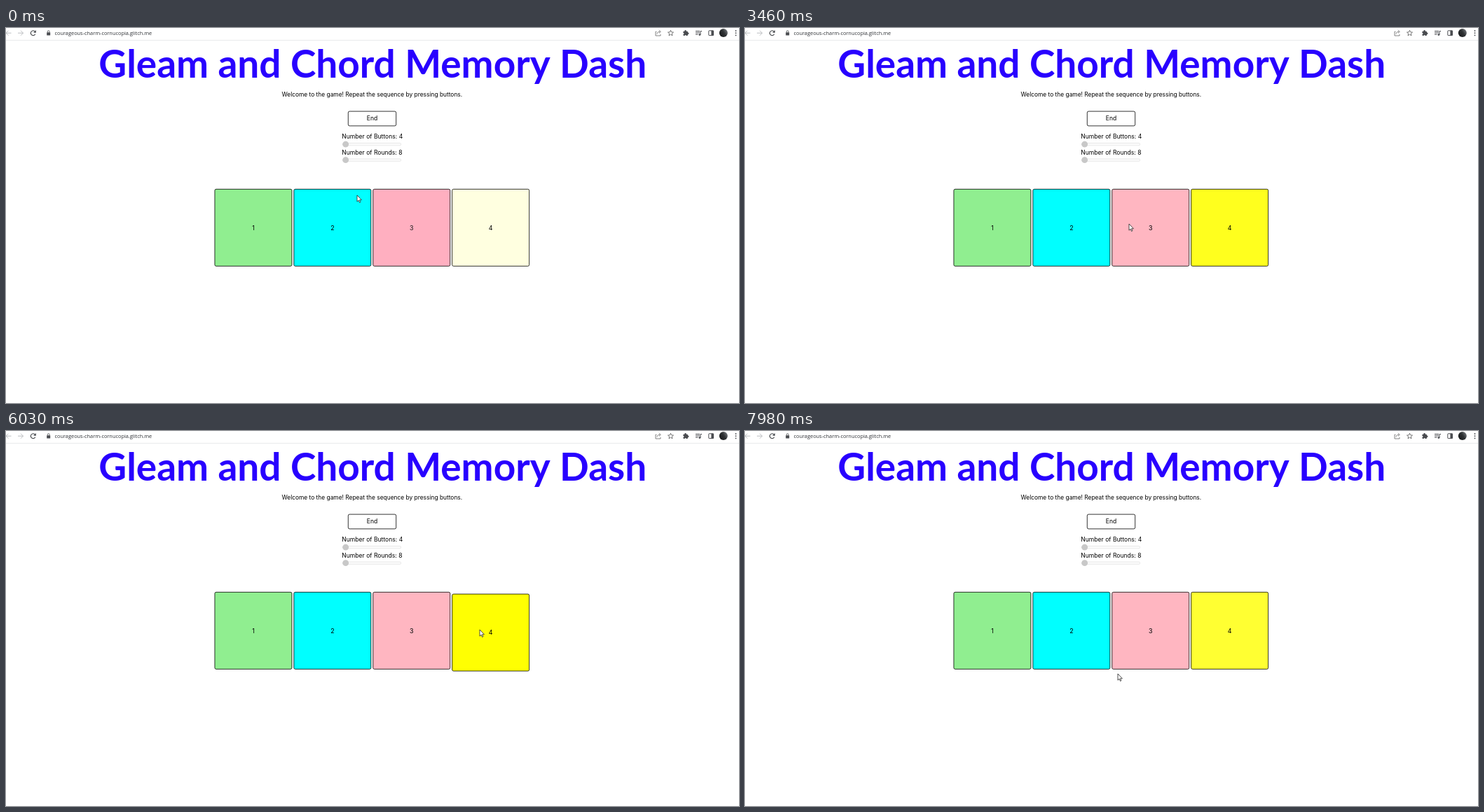
Recreate the animation shown at these times as an HTML page with a canvas. Size 1046 by 536 pixels, loop 8000 ms.

```html
<!DOCTYPE html>
<html lang="en">
<head>
<meta charset="utf-8">
<title>Gleam and Chord Memory Dash</title>
<style>
  html, body { margin: 0; width: 100%; height: 100%; overflow: hidden; background: #fff; }
  canvas { display: block; }
</style>
</head>
<body>
<canvas id="stage" width="1046" height="536"></canvas>
<script>
const ctx = document.getElementById('stage').getContext('2d');
const LOOP = 8000, FADE = 350, PUSH = 2.75;
const TILE = 110, PITCH = 112.9, LEFT = 297.95, TOP = 230.35, EDGE = 0.8;
const BODY = 'Inter, sans-serif';
const TAU = Math.PI * 2;

// on / off times of each glow; "press" also pushes the tile down
const tiles = [
  { rest: [144, 238, 144], glow: [144, 238, 144], ink: 0, cues: [] },
  { rest: [0, 255, 255], glow: [0, 255, 255], ink: 0, cues: [] },
  { rest: [255, 182, 193], glow: [255, 105, 180], ink: 255, cues: [
    { on: -730, off: -220 },
    { on: 530, off: 1470, press: true },
    { on: 2480, off: 2990 },
    { on: 4280, off: 5030, press: true },
    { on: 7035, off: 7545 }
  ] },
  { rest: [255, 255, 224], glow: [255, 255, 0], ink: 0, cues: [
    { on: 3260, off: 3770 },
    { on: 5220, off: 6025, press: true },
    { on: 7815, off: 8325 }
  ] }
];

// time, x, y of the pointer tip
const path = [
  [60, 501, 239], [500, 573, 282], [1500, 573, 282], [2110, 548, 280],
  [5035, 548, 280], [5120, 621, 283], [5230, 676, 284], [6060, 676, 284],
  [6510, 503, 328], [7060, 503, 328], [7300, 499, 337], [7780, 532, 347]
];

const clamp = v => Math.min(1, Math.max(0, v));
const mix = (a, b, k) => a + (b - a) * k;

// the CSS "ease" curve
function ease(x) {
  x = clamp(x);
  let lo = 0, hi = 1;
  for (let i = 0; i < 18; i++) {
    const u = (lo + hi) / 2;
    const bx = 0.75 * u * (1 - u) + u * u * u;
    if (bx < x) lo = u; else hi = u;
  }
  const u = (lo + hi) / 2;
  return 0.3 * u * (1 - u) * (1 - u) + 3 * u * u * (1 - u) + u * u * u;
}

const level = (cue, t) => ease((t - cue.on) / FADE) * (1 - ease((t - cue.off) / FADE));

function pointerAt(t) {
  let i = 0;
  while (i < path.length - 1 && path[i + 1][0] <= t) i++;
  const a = path[i], b = path[i + 1] || a;
  const u = b === a ? 0 : clamp((t - a[0]) / (b[0] - a[0]));
  const quick = b[0] - a[0] < 120;
  const k = quick ? u : u * u * (3 - 2 * u);
  return [mix(a[1], b[1], k), mix(a[2], b[2], k)];
}

// font size at which a line of text spans the given width
function sizeFor(str, width, family, weight) {
  ctx.font = `${weight} 100px ${family}`;
  return width / ctx.measureText(str).width * 100;
}

function label(str, x, y, size, family = BODY, weight = 400, align = 'center', color = '#000') {
  ctx.font = `${weight} ${size}px ${family}`;
  ctx.textAlign = align;
  ctx.fillStyle = color;
  ctx.fillText(str, x, y);
}

function box(x, y, w, h, r, fill, stroke, line = 1) {
  ctx.beginPath();
  ctx.roundRect(x, y, w, h, r);
  if (fill) { ctx.fillStyle = fill; ctx.fill(); }
  if (stroke) { ctx.strokeStyle = stroke; ctx.lineWidth = line; ctx.stroke(); }
}

function dot(x, y, r, fill) {
  ctx.beginPath();
  ctx.arc(x, y, r, 0, TAU);
  ctx.fillStyle = fill;
  ctx.fill();
}

function line(d, color, width = 1) {
  ctx.strokeStyle = color;
  ctx.lineWidth = width;
  ctx.stroke(new Path2D(d));
}

function fillPath(d, color) {
  ctx.fillStyle = color;
  ctx.fill(new Path2D(d));
}

const TITLE = 'Gleam and Chord Memory Dash';
const WELCOME = 'Welcome to the game! Repeat the sequence by pressing buttons.';
const BUTTONS = 'Number of Buttons: 4';
const ADDRESS = 'courageous-charm-cornucopia.glitch.me';
const size = {
  title: sizeFor(TITLE, 782, 'Lato, sans-serif', 700),
  welcome: sizeFor(WELCOME, 258.5, BODY, 400),
  label: sizeFor(BUTTONS, 87, BODY, 400),
  address: sizeFor(ADDRESS, 139, '"Open Sans", sans-serif', 400)
};

function drawStar(x, y, r) {
  ctx.beginPath();
  for (let i = 0; i < 10; i++) {
    const a = i * TAU / 10 - TAU / 4, d = i % 2 ? r * 0.45 : r;
    ctx.lineTo(x + d * Math.cos(a), y + d * Math.sin(a));
  }
  ctx.closePath();
  ctx.strokeStyle = '#555';
  ctx.lineWidth = 0.8;
  ctx.stroke();
}

function drawBar() {
  const dark = '#4a4c50', pale = '#bcbec1';
  line('M0 7.2H7.5M3.5 3.7L0 7.2L3.5 10.7', pale);
  line('M17 7.2H24.5M21 3.7L24.5 7.2L21 10.7', pale);
  ctx.beginPath();
  ctx.arc(38.8, 7.2, 3.4, 0.5, 5.5);
  ctx.strokeStyle = dark;
  ctx.lineWidth = 1.1;
  ctx.stroke();
  fillPath('M42.8 3V6.7H39.1Z', dark);

  box(58.2, 6.3, 5, 4.2, 0.5, dark);
  line('M59.3 6.5V5.2A1.4 1.5 0 0 1 62.1 5.2V6.5', dark, 0.8);
  label(ADDRESS, 69.5, 10, size.address, '"Open Sans", sans-serif', 400, 'left', '#2f3236');

  line('M928.5 5.2H927V11H934V9M929 8.7C929.2 6.5 930.5 5.3 933 5.3M931.8 3.2L934.3 5.3L931.8 7.5', '#666', 0.8);
  drawStar(948.5, 7.4, 4.2);
  box(966.4, 4.7, 6.6, 6.2, 0.8, dark);
  dot(969.6, 4.4, 1.3, dark);
  dot(973.2, 7.7, 1.3, dark);
  dot(966.5, 7.9, 1, '#fff');
  dot(969.6, 10.9, 1, '#fff');
  line('M984 4.5H990M984 6.8H990M984 9.1H987.5M991 9.6V4.6H993', dark);
  dot(989.9, 9.6, 1.4, dark);
  box(1002.8, 3.8, 6.8, 6.8, 0.6, null, dark);
  box(1006.4, 3.8, 3.2, 6.8, 0, dark);

  const g = ctx.createLinearGradient(1018, 11, 1030, 3);
  g.addColorStop(0, '#161819');
  g.addColorStop(0.55, '#303335');
  g.addColorStop(1, '#7d8184');
  dot(1023.8, 7, 6, g);
  for (let i = -1; i < 2; i++) dot(1041.5, 7.2 + i * 3.2, 0.9, dark);

  ctx.fillStyle = '#e9eaeb';
  ctx.fillRect(0, 17, 1046, 1);
}

function drawSlider(y) {
  box(480.3, y - 1.7, 83.4, 3.4, 1.7, '#fbfbfb', '#dadada', 0.6);
  dot(484.7, y, 4.4, '#c8c8c8');
}

function drawPanel() {
  label(TITLE, 523.3, 71, size.title, 'Lato, sans-serif', 700, 'center', '#2800ff');
  label(WELCOME, 522.3, 98, size.welcome);
  box(488.3, 119.1, 68.4, 20.8, 2, '#fff', '#000', EDGE);
  label('End', 522.5, 132.3, size.label);
  label(BUTTONS, 479.3, 158, size.label, BODY, 400, 'left');
  drawSlider(166.2);
  label('Number of Rounds: 8', 479.3, 180.6, size.label, BODY, 400, 'left');
  drawSlider(188.7);
}

function drawTile(tile, i, t) {
  let lit = 0, push = 0;
  for (const cue of tile.cues) {
    const k = level(cue, t);
    lit = Math.max(lit, k);
    if (cue.press) push = Math.max(push, k * PUSH);
  }
  const x = LEFT + PITCH * i, y = TOP + push;
  const fill = tile.rest.map((c, n) => Math.round(mix(c, tile.glow[n], lit)));
  const ink = Math.round(tile.ink * lit);
  box(x, y, TILE, TILE, 2, `rgb(${fill})`, '#000', EDGE);
  label(i + 1, x + TILE / 2, y + 58.3, size.label + 0.3, BODY, 400, 'center', `rgb(${ink},${ink},${ink})`);
}

function drawPointer(t) {
  const [x, y] = pointerAt(t);
  ctx.save();
  ctx.translate(x, y);
  const arrow = 'M0 0V9.2L2.1 7.3L3.5 10.5L4.9 9.9L3.5 6.8H6.4Z';
  fillPath(arrow, '#fff');
  line(arrow, '#222', 0.8);
  ctx.restore();
}

function draw(now) {
  const t = now % LOOP;
  ctx.fillStyle = '#fff';
  ctx.fillRect(0, 0, 1046, 536);
  drawBar();
  drawPanel();
  tiles.forEach((tile, i) => drawTile(tile, i, t));
  drawPointer(t);
}

const start = performance.now();
function tick() {
  draw(performance.now() - start);
  requestAnimationFrame(tick);
}
tick();
</script>
</body>
</html>
```
